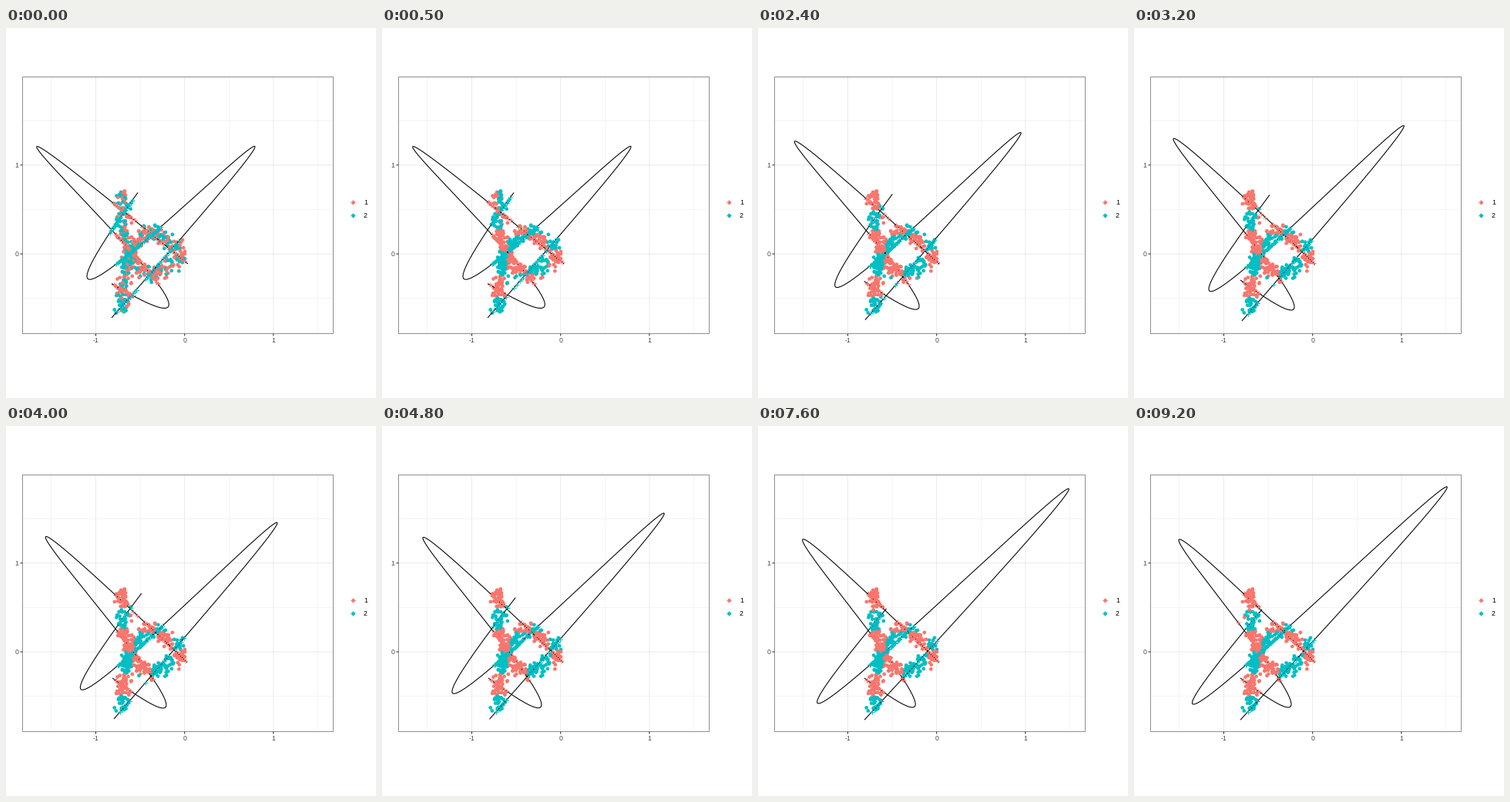
Recreate the animation shown at these times as a matplotlib script. Size 480 px wide and 480 px high, loop 10000 ms.

```python
import numpy as np
import matplotlib.pyplot as plt
from matplotlib.animation import FuncAnimation

plt.rcParams["path.snap"] = False

PX = 0.72                       # points per pixel at 100 dpi
RED, TEAL = "#F8766D", "#00BFC4"
UNIT, X0, Y0 = 115.2, 231.7, 293.0
LEFT, RIGHT, TOP, BOTTOM = 21.5, 424.5, 63.5, 396.5
INTERVAL, FRAMES, FITS = 100, 100, 12
CHANGES = [500, 1000, 1500, *range(2000, 9201, 400)]
T = np.linspace(0, 1, 700)

rng = np.random.default_rng(8)

# Each curve as start, two turning values and end, at three key poses.
ONE = (([137, 211.3, 39.7, 236], [331.5, 363.5, 153.6, 306]),
       ([138, 208, 51, 235], [327, 366, 143.3, 306.5]),
       ([138, 204, 58, 235], [327, 365, 147, 306.5]))
TWO = (([171, 105, 323, 137], [213.5, 326.2, 153.4, 376]),
       ([176, 97, 350.3, 140], [216.5, 341.7, 126.6, 380]),
       ([166, 75.5, 406.3, 138], [238, 361, 78.8, 381.3]))


def cubic(start, first, second, end):
    """Cubic through start and end with the two given turning values."""
    mid, half = (first + second) / 2, (first - second) / 2

    def root(value, pick):
        return pick(np.roots([1, 0, -3, -2 * (value - mid) / half]).real)

    a, b = root(start, min), root(end, max)
    s = a + (b - a) * T
    return mid + half * (s**3 - 3 * s) / 2


def fit(poses, k):
    """Curve after k fits: quick at first, a stall, a long pull, then settling."""
    pos = np.interp(k, [0, 3, 4, 7, 8, 11], [0, 1, 1.03, 1.79, 1.92, 2])
    i = min(int(pos), 1)
    a, b = np.array(poses[i]), np.array(poses[i + 1])
    xs, ys = a + (b - a) * (pos - i)
    return np.column_stack([cubic(*xs), cubic(*ys)])


def cloud(n):
    """Noisy fish outline, mirrored about the horizontal axis."""
    path = np.array([(150, 213), (152, 245), (154, 266), (162, 298),
                     (182, 322), (204, 315), (219, 304), (230, 293)], float)
    length = np.r_[0, np.cumsum(np.hypot(*np.diff(path, axis=0).T))]
    at = rng.uniform(0, length[-1], n)
    pts = np.column_stack([np.interp(at, length, path[:, i]) for i in (0, 1)])
    flip = rng.random(n) < 0.5
    pts[flip, 1] = 2 * Y0 - pts[flip, 1]
    pts += np.clip(rng.normal(0, 4.7, (n, 2)), -10, 10)
    pts[:, 0] = np.minimum(pts[:, 0], 232)
    return pts


points = cloud(500)
curves = [(fit(ONE, k), fit(TWO, k)) for k in range(FITS)]


def project(curve):
    d = np.hypot(points[:, None, 0] - curve[:, 0],
                 points[:, None, 1] - curve[:, 1])
    return curve[d.argmin(axis=1)], d.min(axis=1)


feet = [[project(c) for c in pair] for pair in curves]
labels = [rng.integers(0, 2, len(points))]
labels += [(two[1] < one[1]).astype(int) for one, two in feet]

fig = plt.figure(figsize=(4.8, 4.8), dpi=100, facecolor="white")
ax = fig.add_axes([0, 0, 1, 1])
ax.set(xlim=(0, 480), ylim=(480, 0))
ax.axis("off")


def line(x, y, color, width, z=1):
    return ax.plot(x, y, color=color, lw=width * PX, zorder=z,
                   solid_capstyle="butt")[0]


def label(x, y, text, color, ha):
    ax.text(x, y + 3, text, color=color, ha=ha, va="baseline",
            fontsize=8.8 * PX, family="Liberation Sans")


def crosses(color, x=(), y=()):
    return ax.plot(x, y, "+", ms=5.6 * PX, color=color, mew=0.95 * PX,
                   zorder=5)[0]


for half in range(-3, 4):
    x, y = X0 + half * UNIT / 2, Y0 - half * UNIT / 2
    major = half % 2 == 0
    width = 1.07 if major else 0.53
    line([x, x], [TOP, BOTTOM], "#EBEBEB", width)
    if major:
        line([x, x], [BOTTOM, BOTTOM + 3], "#333333", 1.07)
        label(x, 405, str(half // 2), "#4D4D4D", "center")
    if half >= -1:
        line([LEFT, RIGHT], [y, y], "#EBEBEB", width)
        if major:
            line([LEFT - 3, LEFT], [y, y], "#333333", 1.07)
            label(16.3, y, str(half // 2), "#4D4D4D", "right")

ax.add_patch(plt.Rectangle((LEFT, TOP), RIGHT - LEFT, BOTTOM - TOP, fill=False,
                           ec="#333333", lw=0.55 * PX, zorder=6))

for y, name, color in ((225.8, "1", RED), (243, "2", TEAL)):
    ax.plot(450, y, "o", ms=4.7 * PX, color=color, mew=0)
    crosses(color, [450], [y])
    label(464, y, name, "black", "left")

dots = ax.scatter(*points.T, s=(4.7 * PX) ** 2, lw=0, zorder=3)
lines = [line([], [], "black", 1.07, 4) for _ in range(2)]
marks = [crosses(RED), crosses(TEAL)]
palette = np.array([RED, TEAL])


def update(frame):
    """Steps alternate between relabelling the points and refitting."""
    step = sum(frame * INTERVAL >= t for t in CHANGES)
    k = step // 2
    group = labels[(step + 1) // 2]
    dots.set_facecolor(palette[group])
    for i in range(2):
        lines[i].set_data(*curves[k][i].T)
        marks[i].set_data(*feet[k][i][0][group == i].T)
    return [dots, *lines, *marks]


anim = FuncAnimation(fig, update, frames=FRAMES, interval=INTERVAL,
                     repeat=True, repeat_delay=0)
plt.show()
```
